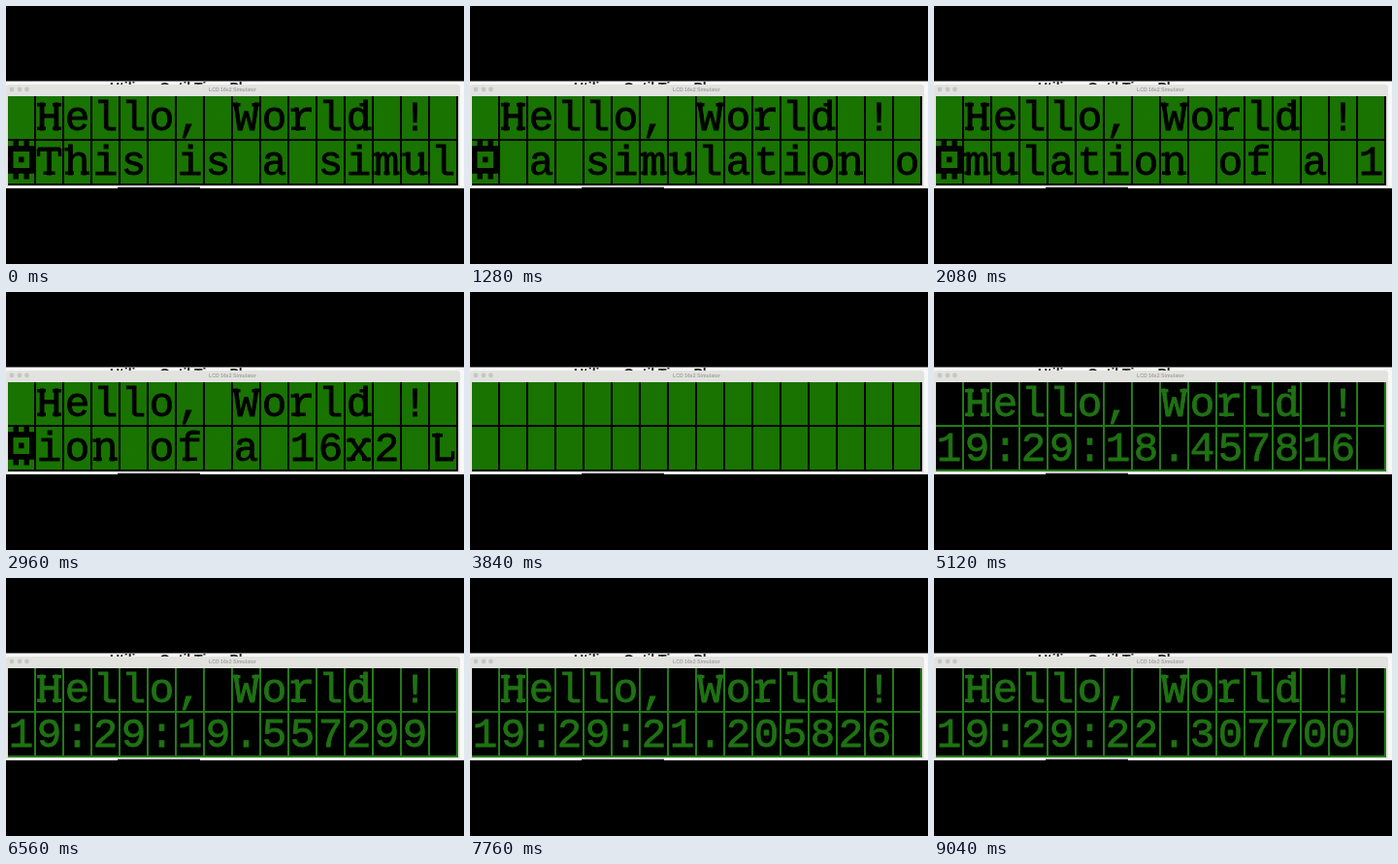
Recreate the animation shown at these times as an HTML page. Size 472 by 266 pixels, loop 9.28 s.

```html
<!DOCTYPE html>
<html lang="en">
<head>
<meta charset="utf-8">
<title>LCD 16x2 Simulator</title>
<style>
html, body { margin: 0; width: 100%; height: 100%; overflow: hidden; background: #000; }
svg { display: block; width: 472px; height: 266px; }
.page { font: bold 14px "Liberation Sans", Arial, sans-serif; fill: #222; }
.title { font: bold 5.2px "Liberation Sans", Arial, sans-serif; fill: #a2a2a0; text-anchor: middle; }
.lcd { --paper: #187300; --ink: #000; --line: #000; }
.lcd.off { --paper: #000; --ink: #1f7213; --line: #237a1a; }
.glass { fill: var(--paper); }
.grid { fill: none; stroke: var(--line); stroke-width: 2; }
.chip { fill: var(--ink); }
.bare .chip { display: none; }
.cell text { font: 42.5px "Liberation Mono", "Courier New", monospace; text-anchor: middle; fill: var(--ink); stroke: var(--ink); stroke-width: .8; }
.cell path { fill: none; stroke: var(--ink); stroke-width: 3.4; }
</style>
</head>
<body>
<svg viewBox="0 0 472 266">
  <clipPath id="strip"><rect y="77.5" width="472" height="110.5"/></clipPath>
  <g clip-path="url(#strip)">
    <rect y="77" width="472" height="111" fill="#f8f8f8"/>
    <text class="page" x="107" y="89">Utiliser Outil Time Plan</text>
    <rect x="115" y="186.7" width="85" height="1.3" fill="#222"/>
  </g>
  <path d="M0 186V84q0-3 3-3H465q3 0 3 3V186z" fill="#e2e2df"/>
  <g fill="#c6c6c4">
    <circle cx="6" cy="86" r="2.4"/><circle cx="14" cy="86" r="2.4"/><circle cx="21.5" cy="86" r="2.4"/>
  </g>
  <text class="title" x="233.5" y="88">LCD 16x2 Simulator</text>
  <g class="lcd" id="lcd">
    <rect class="glass" x="2" y="93" width="464" height="92"/>
    <path class="grid" id="grid"/>
    <path class="chip" id="chip"/>
  </g>
</svg>
<script>
const LOOP = 9280, COLS = 16, PITCH = 29, SWEEP = 1.5;
const HELLO = " Hello, World !";
const SCROLL = "This is a simulation of a 16x2 LCD";
const STEP = 168, LEAD = 8, LAST = 21;
const CLEAR = 3815, OFF = 3870, HELLO_AT = 4370, CLOCK_AT = 4403, TICK = 549.5;
const SECONDS = ["17.908143", "18.457816", "19.008211", "19.557299", "20.106940",
                 "20.656417", "21.205826", "21.756902", "22.307700"];
const CHIP = ["01010", "11111", "10001", "10101", "10001", "11111", "01010"];

// Slab ends per letter: level (b base, x x-height, c cap), centre and width
const LEVEL = { b: -1.7, x: -20.9, c: -26.2 };
const SLABS = {
  H: "c-8,9 c8,9 b-8,9 b8,9", W: "c-10,8 c10,8", T: "b0,12", L: "c-6,11",
  h: "c-10,6 b-8,9 b8,9", n: "x-10,6 b-8,9 b8,9", u: "x-10,6 x6,6 b10,6",
  m: "x-11,5 b-10,6 b0,6 b10,6", r: "x-8,8 b-4,15", d: "c5,8 b10,6",
  f: "b0,15", x: "x-8,9 x8,9 b-8,9 b8,9"
};
const TICKS = { T: "M-11 -27v8M11 -27v8", L: "M10 -1.7v-8" };

const lcd = document.getElementById("lcd");

function slabs(ch) {
  const ends = (SLABS[ch] || "").split(" ").filter(Boolean).map(s => {
    const [x, w] = s.slice(1).split(",").map(Number);
    return `M${x - w / 2} ${LEVEL[s[0]]}h${w}`;
  });
  return ends.join("") + (TICKS[ch] || "");
}

function add(parent, tag) {
  return parent.appendChild(document.createElementNS("http://www.w3.org/2000/svg", tag));
}

function makeCell(col, row) {
  const g = add(lcd, "g");
  g.setAttribute("class", "cell");
  g.setAttribute("transform", `translate(${15.5 + col * PITCH} ${row ? 174 : 128})`);
  return { label: add(g, "text"), ends: add(g, "path"), ch: "" };
}

function put(cell, ch) {
  if (cell.ch === ch) return;
  cell.ch = ch;
  cell.label.textContent = ch.trim();
  cell.ends.setAttribute("d", slabs(ch));
}

let lines = "M2 138H466M2 184H466";
for (let i = 0; i < COLS; i++) lines += `M${30 + i * PITCH} 93V185`;
document.getElementById("grid").setAttribute("d", lines);

let dots = "";
CHIP.forEach((bits, r) => [...bits].forEach((bit, c) => {
  if (bit === "1") dots += `M${2 + c * 5.5} ${138.5 + r * 5.7}h5.5v5.7h-5.5z`;
}));
document.getElementById("chip").setAttribute("d", dots);

const rows = [0, 1].map(r => Array.from({ length: COLS }, (_, c) => makeCell(c, r)));

function topChar(col, t) {
  const shown = t < CLEAR || t >= HELLO_AT + col * SWEEP;
  return shown && HELLO[col] || " ";
}

// Cells are rewritten from left to right; past its end the text leaves old cells as they are
function bottomChar(col, t) {
  const lag = col * SWEEP;
  if (t < CLEAR) {
    if (col === 0) return " ";
    const shift = Math.max(0, Math.min(LAST, Math.floor((t + LEAD - lag) / STEP)));
    return SCROLL[Math.min(shift + col, SCROLL.length) - 1];
  }
  const n = Math.floor((t - CLOCK_AT - lag) / TICK);
  if (n < 0) return " ";
  return ("19:29:" + SECONDS[Math.min(n, SECONDS.length - 1)])[col] || " ";
}

function draw(now) {
  const t = now % LOOP;
  lcd.classList.toggle("bare", t >= CLEAR);
  lcd.classList.toggle("off", t >= OFF);
  for (let c = 0; c < COLS; c++) {
    put(rows[0][c], topChar(c, t));
    put(rows[1][c], bottomChar(c, t));
  }
}

const start = performance.now();
function frame() {
  draw(performance.now() - start);
  requestAnimationFrame(frame);
}
frame();
</script>
</body>
</html>
```
